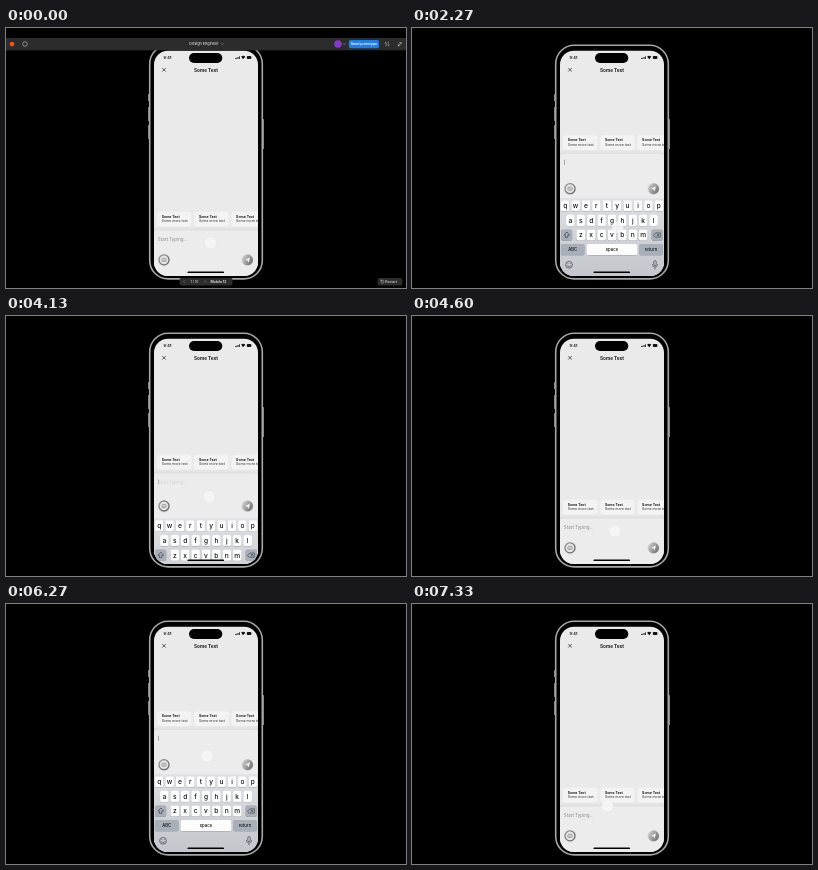
An HTML page that plays this animation: 400x260 px, repeating every 8000 ms.

```html
<!DOCTYPE html>
<html lang="en">
<head>
<meta charset="utf-8">
<style>
html, body { margin: 0; width: 100%; height: 100%; overflow: hidden; background: #000; }
svg { display: block; width: 100vw; height: 100vh; }
text { font-family: Inter, "Liberation Sans", sans-serif; }
</style>
</head>
<body>
<svg id="stage" viewBox="0 0 400 260"></svg>
<script>
const LOOP = 8000, FPS = 15, OPEN_SHIFT = 76.5;

// y is the vertical centre of the capitals
const text = (str, x, y, size, { fill = '#1c1c1c', weight = 400, anchor = 'start', extra = '' } = {}) =>
  `<text x="${x}" y="${(y + size * 0.364).toFixed(2)}" font-size="${size}" font-weight="${weight}" fill="${fill}" text-anchor="${anchor}" ${extra}>${str}</text>`;
const rect = (x, y, w, h, r, fill, extra = '') =>
  `<rect x="${x}" y="${y}" width="${w}" height="${h}" rx="${r}" fill="${fill}" ${extra}/>`;
const circle = (x, y, r, fill, extra = '') =>
  `<circle cx="${x}" cy="${y}" r="${r}" fill="${fill}" ${extra}/>`;
const line = (d, stroke, width = 0.6) =>
  `<path d="${d}" fill="none" stroke="${stroke}" stroke-width="${width}" stroke-linecap="round" stroke-linejoin="round"/>`;
const gradient = (id, from, to, direction = 'x2="0" y2="1"') =>
  `<linearGradient id="${id}" ${direction}><stop stop-color="${from}"/><stop offset="1" stop-color="${to}"/></linearGradient>`;

const chip = x =>
  rect(x, 184.3, 34.5, 15, 3, '#000', 'opacity=".03"') +
  rect(x, 183.7, 34.5, 15, 3, '#f3f3f3') +
  text('Some Text', x + 4.7, 188.3, 3.5, { weight: 700 }) +
  text('Some more text', x + 4.7, 193.1, 3.5, { fill: '#333' });

const key = (x, y, w, fill, label = '', size = 6.6) =>
  rect(x - w / 2, y - 5.3, w, 11.2, 1.7, '#9a9da3') +
  rect(x - w / 2, y - 5.6, w, 11.1, 1.7, fill) +
  text(label, x, y, size, { fill: '#111', anchor: 'middle', weight: 500 });

const keyRow = (letters, row) =>
  [...letters].map((c, i) =>
    key(200 + (i - (letters.length - 1) / 2) * 10.4, 177.8 + row * 14.6, 8.6, '#fdfdfd', c)).join('');

function keyboard() {
  const gray = '#a9afb9', ink = '#333', faint = '#50555d';
  return rect(148, 170.3, 104, 80, 0, 'url(#tray)') +
    ['qwertyuiop', 'asdfghjkl', 'zxcvbnm'].map(keyRow).join('') +
    key(154.6, 207, 11.2, gray) +
    line('M154.6 204.3l-2.6 2.8h1.4v2.4h2.4v-2.4h1.4z', ink) +
    key(245.2, 207, 11.2, gray) +
    line('M241.7 207l2-2.1h4.6v4.2h-4.6zM245 206.1l1.8 1.8m0-1.8l-1.8 1.8', ink, 0.6) +
    key(160.7, 221.6, 23.6, gray, 'ABC', 4.3) +
    key(200, 221.6, 51, '#fdfdfd', 'space', 4.3) +
    key(239, 221.6, 23.6, gray, 'return', 4.3) +
    circle(157, 236.8, 3.4, 'none', `stroke="${faint}" stroke-width=".8"`) +
    line('M155 237.7q2 2.4 4 0M155.8 235.5v.2m2.4-.2v.2', faint, 0.7) +
    rect(241.8, 232.6, 2.4, 5, 1.2, 'none', `stroke="${faint}" stroke-width=".8"`) +
    line('M240.4 236.4q.3 2.8 2.6 2.8t2.6-2.8M243 239.2v1.8', faint, 0.7);
}

function composerIcons() {
  return circle(158, 232.2, 6.2, '#000', 'opacity=".06"') +
    circle(158, 231.8, 5, '#e4e4e4', 'stroke="url(#ring)" stroke-width="1.3"') +
    rect(155.9, 230.4, 4.2, 3, 0.8, 'none', 'stroke="#777" stroke-width=".6"') +
    line('M157 232.1h2', '#777', 0.5) +
    circle(241.5, 232.2, 6, '#000', 'opacity=".06"') +
    circle(241.5, 231.8, 5.5, 'url(#metal)') +
    '<path d="M239.4 231.8l4.4-2.3-1.1 5-1.2-2z" fill="#fff"/>';
}

function phoneBody() {
  const side = (x, y, h) => rect(x, y, 1.6, h, 0.6, '#858585');
  return side(142, 66, 7) + side(142, 79, 14) + side(142, 97, 14) + side(256.4, 91, 30) +
    rect(143.7, 17.3, 112.6, 233.6, 18.5, '#000', 'stroke="#a6a6a6" stroke-width="1.6"') +
    rect(148, 22.7, 104, 225.3, 14, '#eaeaea');
}

function statusBar() {
  return text('9:41', 157.6, 29.4, 3.8, { weight: 700 }) +
    rect(183, 25, 33.3, 10, 5, '#000') +
    [0, 1, 2, 3].map(i => rect(229 + i * 1.3, 30.1 - i * 0.6, 0.9, 1 + i * 0.6, 0.3, '#111')).join('') +
    '<path d="M235.1 28.7q2.1-1.9 4.2 0l-2.1 2.5z" fill="#111"/>' +
    rect(240.8, 27.9, 4.6, 3, 1, '#111') +
    line('M156.5 40.3l3 3m0-3l-3 3', '#222', 0.7) +
    text('Some Text', 200, 41.9, 4.7, { weight: 700, anchor: 'middle' });
}

function toolbar() {
  const white = { fill: '#eee' };
  return rect(0, 10, 400, 12.3, 0, '#2c2c2c') +
    circle(6, 16.1, 2.4, '#f24e1e') +
    circle(19, 16, 2.3, 'none', 'stroke="#ccc" stroke-width=".6"') +
    text('Design Engineer', 198, 16, 3.8, { ...white, anchor: 'middle' }) +
    line('M215.2 15.6l1.1 1.1 1.1-1.1', '#aaa', 0.5) +
    circle(332, 16, 3.8, '#8638c9') +
    line('M337.4 15.6l1 1 1-1', '#aaa', 0.5) +
    rect(342.8, 12, 30.2, 8.2, 1.8, '#1c7ee6') +
    text('Send prototype', 357.9, 16.1, 3.55, { fill: '#fff', weight: 600, anchor: 'middle' }) +
    line('M380 18v-4l-1 1m3.2-1v4l1-1', '#ccc', 0.5) +
    line('M392.2 17.8l3-3.2m-1.6 0h1.6v1.6m-3 0v1.6h1.6', '#ccc', 0.5) +
    rect(173.5, 250, 53, 7.4, 1.8, '#2c2c2c') +
    line('M178.6 252.6l-1 1.1 1 1.1M198.8 252.6l1 1.1-1 1.1', '#888', 0.5) +
    text('1 / 10', 188.4, 253.7, 3.4, { ...white, anchor: 'middle' }) +
    text('Mobile 12', 204.5, 253.7, 3.5, { ...white, weight: 600 }) +
    rect(371.6, 250, 24.8, 7.4, 1.8, '#2c2c2c') +
    line('M375 252.8q1.6-1.4 2.7 0t-.6 2.3-2-.8M375 251.8v1.2h1.2', '#ccc', 0.5) +
    text('Restart', 379.3, 253.7, 3.5, white);
}

document.getElementById('stage').innerHTML = `
<defs>
  ${gradient('metal', '#d2d2d2', '#6c6c6c', 'y1=".2" y2=".8"')}
  ${gradient('ring', '#999', '#646464', 'y2="1"')}
  ${gradient('shade', '#0000', '#00000012', 'x2="0" y2="1"')}
  ${gradient('tray', '#dfe0e4', '#c2c5cb')}
  <clipPath id="screen">${rect(148, 22.7, 104, 225.3, 14, '#fff')}</clipPath>
</defs>
<rect width="400" height="260"/>
${phoneBody()}
<g clip-path="url(#screen)">
  <g id="sheet">
    ${[0, 1, 2].map(i => chip(151 + i * 37.2)).join('')}
    ${rect(148, 198.5, 104, 5, 0, 'url(#shade)')}
    ${rect(148, 202.3, 104, 140, 4, '#ececec')}
    ${text('Start Typing...', 151.8, 211, 4.5, { fill: '#8c8c8c', extra: 'id="hint"' })}
    ${rect(152.3, 208.2, 0.7, 5, 0.3, '#888', 'id="caret"')}
  </g>
  <g id="icons">${composerIcons()}</g>
  <g id="keyboard">${keyboard()}</g>
  ${statusBar()}
  ${rect(181.5, 243.6, 36.5, 1.5, 0.7, '#000')}
  <circle id="pointer" r="6" fill="#fafafa" fill-opacity=".72" stroke="#000" stroke-opacity=".05" stroke-width=".6"/>
</g>
<g id="toolbar">${toolbar()}</g>`;

const parts = Object.fromEntries(
  ['sheet', 'hint', 'caret', 'icons', 'keyboard', 'pointer', 'toolbar'].map(id => [id, document.getElementById(id)]));

const linear = u => u;
const smooth = u => u * u * (3 - 2 * u);
const ramp = (t, from, to, ease = smooth) =>
  ease(Math.min(1, Math.max(0, (t - from) / (to - from))));

// Tap to open, drag down and let go, flick up, drag down and let go again
function pose(t) {
  const tap = ramp(t, 1600, 1950);
  const lift = ramp(t, 2200, 2400);
  const settle = ramp(t, 2800, 3200);
  const drag1 = ramp(t, 3380, 3870, linear), drop1 = ramp(t, 4090, 4600);
  const flick = ramp(t, 5120, 5600, linear), reopen = ramp(t, 5070, 5480);
  const aim = ramp(t, 5800, 6000);
  const drag2 = ramp(t, 6470, 6930, linear), drop2 = ramp(t, 6930, 7333);
  return {
    open: tap - 0.4 * drag1 - 0.6 * drop1 + reopen - 0.51 * drag2 - 0.49 * drop2,
    x: 204.5 + 4.5 * lift - 5 * settle - drag1 - 2 * flick + drag2 - 6.5 * drop2,
    y: 215 - 61 * lift - settle + 27 * drag1 + 35 * drop1 - 54 * flick - 9 * aim + 28 * drag2 + 22 * drop2
  };
}

const move = (node, x, y) => node.setAttribute('transform', `translate(${x} ${y})`);
const fade = (node, opacity) => node.setAttribute('opacity', Math.min(1, Math.max(0, opacity)));

function render(ms) {
  const t = Math.floor((ms % LOOP + 4) * FPS / 1000) * 1000 / FPS;
  const { open, x, y } = pose(t);
  const shift = open * OPEN_SHIFT;
  move(parts.sheet, 0, -shift);
  move(parts.icons, 0, -shift * 0.93);
  move(parts.keyboard, 0, (OPEN_SHIFT + 1.5) * (1 - open));
  move(parts.pointer, x, y);
  fade(parts.hint, Math.max(0, 1 - open) ** 1.5);
  fade(parts.caret, open * 1.2);
  fade(parts.toolbar, 1 - t / 533);
}

const start = performance.now();
function tick() {
  render(performance.now() - start);
  requestAnimationFrame(tick);
}
tick();
</script>
</body>
</html>
```
